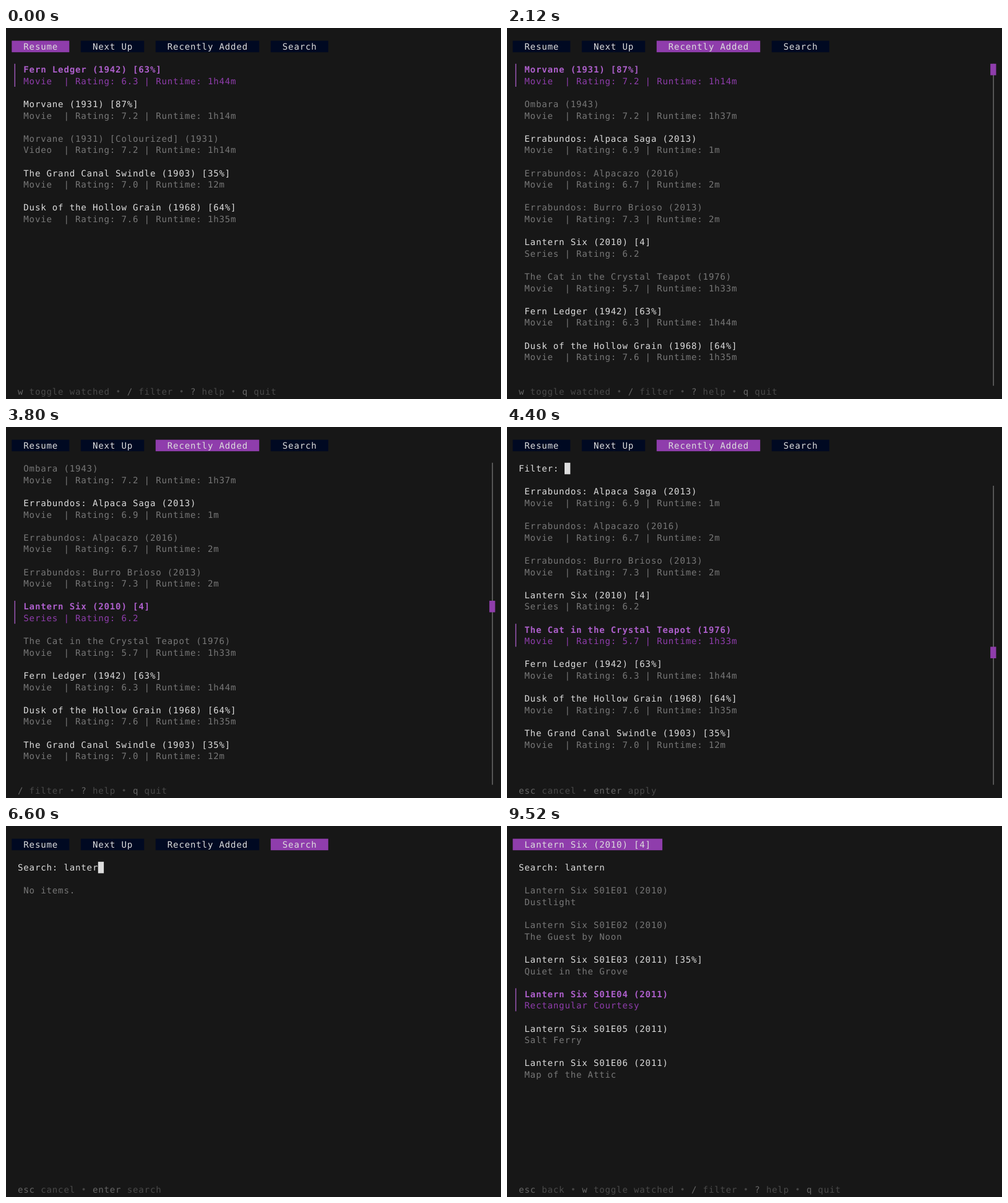
An HTML page for the animation above (9.72 s loop, 800x600 px).

```html
<!DOCTYPE html>
<html lang="en">
<head>
<meta charset="utf-8">
<title>Media library terminal</title>
<style>
  html, body { margin: 0; width: 100%; height: 100%; overflow: hidden; background: #171717; }
  svg { display: block; width: 800px; height: 600px; }
  text {
    font: 14.1px "DejaVu Sans Mono", "Noto Sans Mono", monospace;
    text-anchor: middle;
    white-space: pre;
    text-rendering: geometricPrecision;
  }
</style>
</head>
<body>
<svg id="screen" viewBox="0 0 800 600" xmlns="http://www.w3.org/2000/svg"></svg>
<script>
const LOOP = 9720;
const CW = 9.3, RH = 18.6, TOP = 20.6, BASE = 14.4;
const HELP_ROW = 30;
const C = {
  bg: '#171717', text: '#dddddd', dim: '#777777',
  tab: '#000922', active: '#8f3dac', pick: '#ad5fcb', pickDim: '#8f3dac',
  key: '#666666', hint: '#4a4a4a', dot: '#444444'
};

// Library
const film = (title, rating, time, seen = false, kind = 'Movie') => ({
  title, seen, kind,
  desc: `${kind.padEnd(6)} | Rating: ${rating}` + (time ? ` | Runtime: ${time}` : '')
});
const episode = (n, year, desc, seen = false, mark = '') => ({
  title: `Lantern Six S01E0${n} (${year})${mark}`, desc, seen, kind: 'Episode'
});

const jungle = film('Fern Ledger (1942) [63%]', '6.3', '1h44m');
const count = film('Morvane (1931) [87%]', '7.2', '1h14m');
const tinted = film('Morvane (1931) [Colourized] (1931)', '7.2', '1h14m', true, 'Video');
const heist = film('The Grand Canal Swindle (1903) [35%]', '7.0', '12m');
const dusk = film('Dusk of the Hollow Grain (1968) [64%]', '7.6', '1h35m');
const series = film('Lantern Six (2010) [4]', '6.2', '', false, 'Series');
const episodes = [
  episode(1, 2010, 'Dustlight', true),
  episode(2, 2010, 'The Guest by Noon', true),
  episode(3, 2011, 'Quiet in the Grove', false, ' [35%]'),
  episode(4, 2011, 'Rectangular Courtesy'),
  episode(5, 2011, 'Salt Ferry'),
  episode(6, 2011, 'Map of the Attic')
];
const resume = [jungle, count, tinted, heist, dusk];
const recent = [
  count,
  film('Ombara (1943)', '7.2', '1h37m', true),
  film('Errabundos: Alpaca Saga (2013)', '6.9', '1m'),
  film('Errabundos: Alpacazo (2016)', '6.7', '2m', true),
  film('Errabundos: Burro Brioso (2013)', '7.3', '2m', true),
  series,
  film('The Cat in the Crystal Teapot (1976)', '5.7', '1h33m', true),
  jungle, dusk, heist, tinted
];
const matching = q => recent.filter(m => m.title.toLowerCase().includes(q));

// Timeline: each entry changes part of the state
const start = {
  tab: 0, list: resume, sel: 0, spin: -1,
  label: '', query: '', typing: false, title: ''
};
const steps = [[0, start]];
const at = (t, change) => steps.push([t, { ...steps[steps.length - 1][1], ...change }]);
// Keystrokes about 100 ms apart, shown on a 40 ms clock
const keyTime = (t, n) => t + Math.ceil(n * 2.5) * 40;
const selectAt = (times, first) => times.forEach((t, i) => at(t, { sel: first + i }));

selectAt([520, 720, 1120], 1);
at(1400, { tab: 1, spin: 1 });
at(1520, { list: [episodes[2]], sel: 0, spin: -1 });
at(2000, { tab: 2, spin: 3 });
at(2120, { list: recent, sel: 0, spin: -1 });
selectAt([2600, 2920, 3200, 3520, 3800, 4120], 1);
at(4400, { label: 'Filter: ', typing: true });
for (let n = 1; n <= 4; n++) {
  const query = 'erra'.slice(0, n);
  at(keyTime(4400, n), { query, list: matching(query), sel: 0 });
}
at(4920, { typing: false });
at(5520, { tab: 3, list: [], label: 'Search: ', query: '' });
at(5920, { typing: true });
for (let n = 1; n <= 7; n++) at(keyTime(5920, n), { query: 'lantern'.slice(0, n) });
at(6720, { typing: false, spin: 5 });
at(6800, { list: [series], sel: 0, spin: -1 });
at(7800, { title: series.title, spin: 7 });
at(7920, { list: episodes, sel: 0, spin: -1 });
selectAt([8920, 9200, 9520], 1);

// Terminal cell drawing
const num = v => +v.toFixed(2);
const yOf = row => TOP + row * RH;
const box = (x, y, w, h, fill) =>
  `<rect x="${num(x)}" y="${num(y)}" width="${num(w)}" height="${num(h)}" fill="${fill}"/>`;
const cells = (col, row, w, h, fill) => box(col * CW, yOf(row), w * CW, h * RH, fill);
const rule = (col, row, h, fill) =>
  box((col + 0.5) * CW - 0.35, yOf(row), 1.3, h * RH, fill);
function write(col, row, str, fill, bold) {
  if (!str) return '';
  const xs = [...str].map((_, i) => num((col + i + 0.5) * CW)).join(' ');
  const weight = bold ? ' style="font-weight:700"' : '';
  return `<text x="${xs}" y="${num(yOf(row) + BASE)}" fill="${fill}"${weight}>${str}</text>`;
}

function spinner(col, k) {
  const gap = k < 4 ? [0, k] : [1, 7 - k];
  let out = '';
  for (let x = 0; x < 2; x++)
    for (let y = 0; y < 4; y++)
      if (x !== gap[0] || y !== gap[1])
        out += box(col * CW + 2.4 + x * 4.5, yOf(0) + 3.4 + y * 4.1, 2, 2, C.pick);
  return out;
}

function header(s) {
  const names = s.title ? [s.title] : ['Resume', 'Next Up', 'Recently Added', 'Search'];
  let col = 1, out = '';
  names.forEach((name, i) => {
    const w = name.length + 4;
    const on = s.title || i === s.tab;
    out += cells(col, 0, w, 1, on ? C.active : C.tab) + write(col + 2, 0, name, C.text);
    col += w + 2;
  });
  return out + (s.spin < 0 ? '' : spinner(col + 2, s.spin));
}

function prompt(s) {
  if (!s.label) return '';
  const str = s.label + s.query;
  return write(2, 2, str.trimEnd(), C.text) +
    (s.typing ? cells(2 + str.length, 2, 1, 1, C.text) : '');
}

function listing(s) {
  const top = s.label ? 4 : 2;
  const n = s.list.length;
  if (!n) return write(3, top, 'No items.', C.dim);
  const rows = HELP_ROW - top;
  const fit = Math.floor(rows / 3);
  const first = Math.max(0, Math.min(s.sel - Math.floor(fit / 2), n - fit));
  let out = '';
  s.list.slice(first, first + fit).forEach((m, i) => {
    const row = top + i * 3;
    const on = first + i === s.sel;
    if (on) out += rule(1, row, 2, C.pick);
    out += write(3, row, m.title, on ? C.pick : m.seen ? C.dim : C.text, on);
    out += write(3, row + 1, m.desc, on ? C.pickDim : C.dim);
  });
  if (n > fit) {
    out += rule(84, top, rows, C.dim);
    out += cells(84, top + Math.floor(s.sel * rows / n), 1, 1, C.active);
  }
  return out;
}

function hints(s) {
  const action = s.tab === 3 && !s.title ? 'search' : 'filter';
  const item = s.list[s.sel];
  const keys = [];
  if (s.typing) {
    keys.push(['esc', 'cancel'], ['enter', action === 'search' ? 'search' : 'apply']);
  } else {
    if (s.title) keys.push(['esc', 'back']);
    else if (s.query) keys.push(['esc', 'clear']);
    if (s.spin < 0 && item && item.kind !== 'Series') keys.push(['w', 'toggle watched']);
    keys.push(['/', action], ['?', 'help'], ['q', 'quit']);
  }
  let col = 2, out = '';
  keys.forEach(([key, hint], i) => {
    if (i) {
      out += `<circle cx="${num((col + 1.5) * CW)}" cy="${num(yOf(HELP_ROW) + 8.9)}" r="1.9" fill="${C.dot}"/>`;
      col += 3;
    }
    out += write(col, HELP_ROW, key, C.key) + write(col + key.length + 1, HELP_ROW, hint, C.hint);
    col += key.length + 1 + hint.length;
  });
  return out;
}

const screen = document.getElementById('screen');
let shown = null;
function draw(now) {
  const t = now % LOOP;
  let state = start;
  for (const [time, s] of steps) if (time <= t) state = s;
  if (state === shown) return;
  shown = state;
  screen.innerHTML = box(0, 0, 800, 600, C.bg) +
    header(state) + prompt(state) + listing(state) + hints(state);
}

const began = performance.now();
function tick() {
  draw(performance.now() - began);
  requestAnimationFrame(tick);
}
tick();
</script>
</body>
</html>
```
